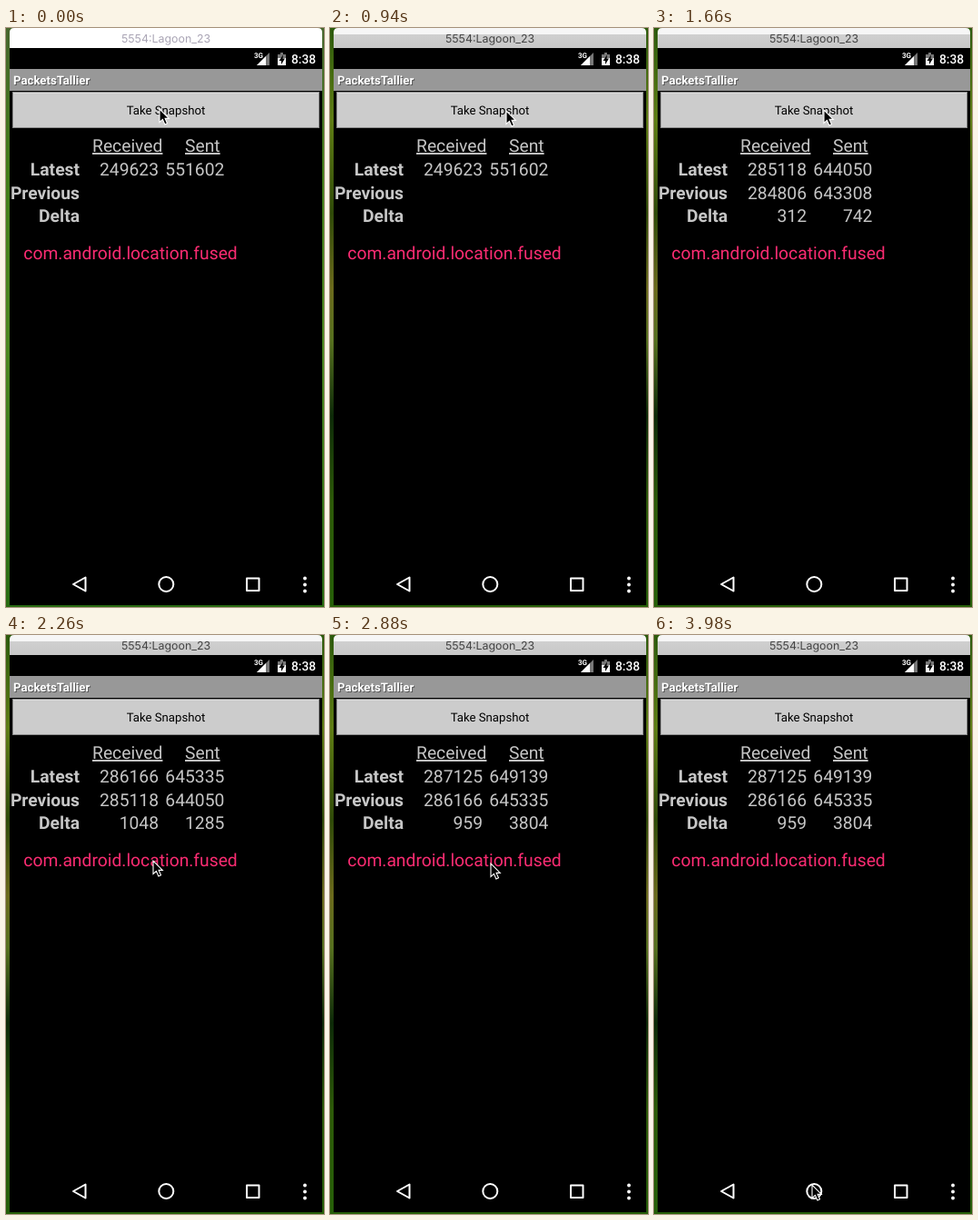
Write an HTML page that moves like this. It is 350x636 px and loops after 4 s.

```html
<!DOCTYPE html>
<html lang="en">
<head>
<meta charset="utf-8">
<title>Traffic snapshot</title>
<style>
html, body { margin: 0; width: 100%; height: 100%; overflow: hidden; background: #000; }
svg { display: block; width: 350px; height: 636px; font-family: Roboto, sans-serif; text-rendering: geometricPrecision; }
.table { font-size: 19.3px; fill: #c6c6c6; }
.bold { font-weight: 700; }
.end { text-anchor: end; }
.mid { text-anchor: middle; }
.under { text-decoration: underline; text-decoration-thickness: 1px; }
.nav { fill: none; stroke: #fff; stroke-width: 2; stroke-linejoin: round; }
</style>
</head>
<body>
<svg viewBox="0 0 350 636">
  <defs>
    <linearGradient id="leaves" x2="0" y2="1">
      <stop offset="0" stop-color="#2c5a0c"/>
      <stop offset=".16" stop-color="#5f7d14"/>
      <stop offset=".32" stop-color="#2f4a08"/>
      <stop offset=".45" stop-color="#6b6a1c"/>
      <stop offset=".54" stop-color="#56701f"/>
      <stop offset=".67" stop-color="#0d2a08"/>
      <stop offset=".82" stop-color="#2d5a08"/>
      <stop offset="1" stop-color="#265f08"/>
    </linearGradient>
    <linearGradient id="bright" x2="0" y2="1">
      <stop offset="0" stop-color="#47662d"/>
      <stop offset=".25" stop-color="#427d18"/>
      <stop offset=".55" stop-color="#4c8720"/>
      <stop offset="1" stop-color="#286b12"/>
    </linearGradient>
    <linearGradient id="chrome" x2="0" y2="1">
      <stop offset=".3" stop-color="#f6f6f6"/>
      <stop offset=".32" stop-color="#cfcfcf"/>
      <stop offset="1" stop-color="#c8c8c8"/>
    </linearGradient>
  </defs>

  <rect id="back" width="350" height="636"/>
  <path d="M4 8H348V634H4Z"/>
  <path id="frame" d="M4 22V5Q4 0 9 0H343Q348 0 348 5V22Z"/>
  <text id="caption" class="mid" x="176" y="16" font-family="Inter, sans-serif" font-size="12.4">5554:Lagoon_23</text>

  <!-- status bar -->
  <g fill="#fff">
    <text class="bold" x="273" y="33" font-size="8">3G</text>
    <path d="M276 41L290 27V41Z" fill="#777"/>
    <path d="M276 41L286 31V41Z"/>
    <path d="M299 29H302V27H305V29H308V33H299Z" fill="#777"/>
    <path d="M299 33H308V41H299Z"/>
    <path d="M305 29.5L300.5 36H303V40L307 33.5H304.5Z" fill="#000"/>
    <text x="314" y="39" font-size="13.8" font-weight="500">8:38</text>
  </g>

  <!-- app bar and button -->
  <rect x="4" y="45" width="344" height="24" fill="#989898"/>
  <g class="bold" font-size="13.2">
    <text x="9" y="63" fill="#555">PacketsTallier</text>
    <text x="8" y="62" fill="#fff">PacketsTallier</text>
  </g>
  <rect x="7.5" y="70.5" width="337" height="39" fill="#ccc" stroke="#8a8a8a"/>
  <path d="M8 71.5H344" stroke="#dcdcdc"/>
  <text class="mid" x="176" y="95" font-size="13.2">Take Snapshot</text>

  <g class="table">
    <text class="under" x="95" y="136">Received</text>
    <text class="under" x="197" y="136">Sent</text>
    <g id="rows"></g>
    <text x="19.3" y="254" fill="#fb2c72">com.android.location.fused</text>
  </g>

  <g class="nav">
    <path d="M74 611L87.5 603.5V618.5Z"/>
    <circle cx="176.3" cy="611" r="8"/>
    <rect x="265" y="604.5" width="13.5" height="13.5"/>
  </g>
  <g fill="#fff">
    <circle cx="329" cy="604.5" r="1.9"/>
    <circle cx="329" cy="611.5" r="1.9"/>
    <circle cx="329" cy="618.5" r="1.9"/>
  </g>

  <path id="pointer" d="M0 1V15.5L3.4 12.4L5.9 18L8.5 16.8L6.1 11.4H10.3Z" stroke="#fff" stroke-width="1.1"/>
</svg>
<script>
const LOOP = 4000;
const $ = id => document.getElementById(id);

// Snapshots: time, received, sent
const shots = [
  [0, 249623, 551602],
  [1220, 284806, 643308],
  [1520, 285118, 644050],
  [1860, 286166, 645335],
  [2560, 287125, 649139]
];

// Pointer stops: time, x, y
const stops = [
  [0, 169, 88], [300, 169, 88], [940, 194, 90], [1220, 190, 90],
  [1660, 187, 89], [1900, 187, 89], [2220, 162, 247], [2300, 162, 247],
  [2500, 176, 92], [2620, 176, 92], [2840, 177, 250], [2940, 177, 250],
  [3300, 190, 612], [3620, 190, 612], [3920, 174, 603], [4000, 174, 603]
];

const cells = ["Latest", "Previous", "Delta"].map((label, row) => {
  const add = (x, bold) => {
    const el = document.createElementNS("http://www.w3.org/2000/svg", "text");
    el.setAttribute("class", bold ? "end bold" : "end");
    el.setAttribute("x", x);
    el.setAttribute("y", 162 + row * 25.7);
    return $("rows").appendChild(el);
  };
  add(81, true).textContent = label;
  return [add(168), add(240.4)];
});

function showCounts(t) {
  const i = shots.findLastIndex(s => s[0] <= t);
  for (const col of [0, 1]) {
    const now = shots[i][col + 1];
    const old = i ? shots[i - 1][col + 1] : null;
    const values = [now, old ?? "", i ? now - old : ""];
    values.forEach((v, row) => cells[row][col].textContent = v);
  }
}

function movePointer(t) {
  const i = stops.findIndex(s => s[0] > t);
  const [t0, x0, y0] = stops[i - 1], [t1, x1, y1] = stops[i];
  const p = (t - t0) / (t1 - t0), k = p * p * (3 - 2 * p);
  $("pointer").setAttribute("transform", `translate(${x0 + (x1 - x0) * k} ${y0 + (y1 - y0) * k})`);
}

function draw(t) {
  const idle = t < 20; // the window gains focus just after the start
  $("back").setAttribute("fill", idle ? "url(#bright)" : "url(#leaves)");
  $("frame").setAttribute("fill", idle ? "#fff" : "url(#chrome)");
  $("caption").setAttribute("fill", idle ? "#aaa5b5" : "#444");
  showCounts(t);
  movePointer(t);
}

const start = performance.now();
function tick() {
  draw((performance.now() - start) % LOOP);
  requestAnimationFrame(tick);
}
tick();
</script>
</body>
</html>
```
